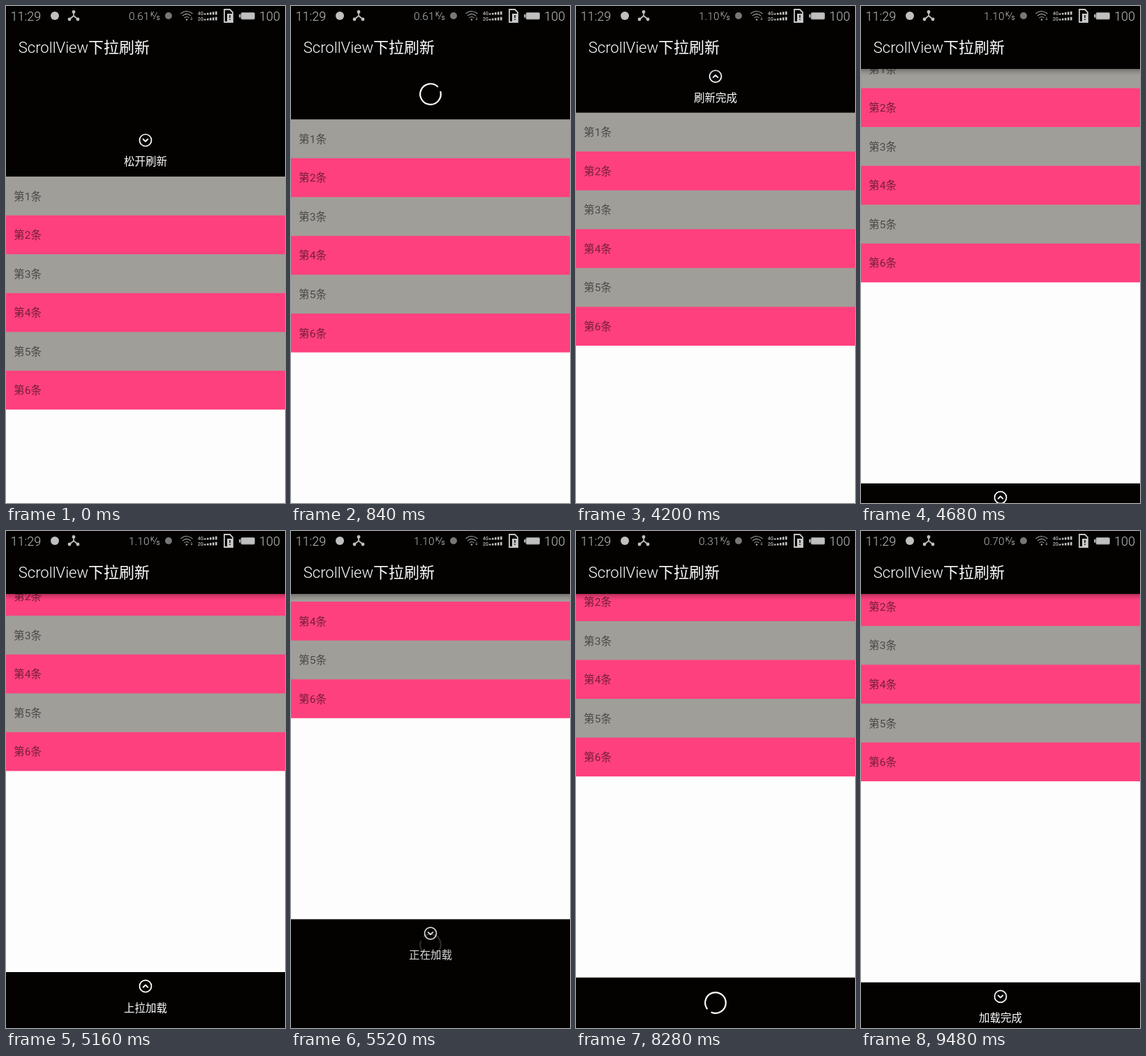
Write an HTML page that moves like this. It is 400x711 px and loops after 9600 ms.

```html
<!DOCTYPE html>
<html lang="zh">
<head>
<meta charset="utf-8">
<title>ScrollView下拉刷新</title>
<style>
  html, body { margin: 0; width: 100%; height: 100%; overflow: hidden; background: #030201; }
  svg { display: block; width: 100%; height: 100%; }
  text { font-family: Roboto, "Noto Sans CJK SC", "Noto Sans CJK", sans-serif; }
  .title { font-size: 22px; font-weight: 300; fill: #fff; }
  .row { font-size: 15.56px; fill: #000; fill-opacity: .54; }
  .label { font-size: 15.56px; fill: #fff; text-anchor: middle; }
  .line { fill: none; stroke: #fff; stroke-linecap: round; stroke-linejoin: round; }
  .status { font-weight: 300; fill: #c0c0c0; }
  .net { font-weight: 400; fill: #b8b8b8; }
  .thin { fill: none; stroke: #a0a0a0; }
</style>
</head>
<body>
<svg viewBox="0 0 400 711" preserveAspectRatio="none">
  <defs>
    <linearGradient id="shade" x1="0" y1="0" x2="0" y2="1">
      <stop offset="0" stop-color="#000" stop-opacity=".3"/>
      <stop offset=".4" stop-color="#000" stop-opacity=".14"/>
      <stop offset="1" stop-color="#000" stop-opacity="0"/>
    </linearGradient>
  </defs>
  <rect width="400" height="711" fill="#030201"/>
  <g id="content">
    <g id="rows"></g>
    <rect y="423.36" width="400" height="287.64" fill="#fdfdfd"/>
    <g id="header" transform="translate(200 17.8)"></g>
    <g id="footer" transform="translate(200 711)"></g>
  </g>
  <rect y="90" width="400" height="9" fill="url(#shade)"/>
  <rect width="400" height="90" fill="#030201"/>
  <text class="title" x="17.8" y="66.7">ScrollView下拉刷新</text>

  <g class="status">
    <text x="6.5" y="21" font-size="18">11:29</text>
    <text x="363" y="21" font-size="18">100</text>
  </g>
  <g class="net">
    <text id="speed" x="176" y="19.5" font-size="15.5" font-weight="300"></text>
    <text x="207" y="14.5" font-size="9">K</text>
    <text x="215.5" y="19.5" font-size="10">s</text>
  </g>
  <path class="thin" d="M211.5 19 L216.5 9"/>
  <circle cx="70" cy="14" r="6" fill="#c0c0c0"/>
  <circle cx="233" cy="14" r="5" fill="#777"/>
  <g fill="#c0c0c0">
    <path d="M97 9 V14 L91 19 M97 14 L103 19" fill="none" stroke="#c0c0c0" stroke-width="1.7"/>
    <circle cx="97" cy="8.5" r="2.4"/>
    <circle cx="91" cy="19" r="2.4"/>
    <circle cx="103" cy="19" r="2.4"/>
  </g>
  <g class="thin" stroke-width="1.1">
    <path d="M250.5 11 Q259 4 267.5 11 M253 14 Q259 8.8 265 14 M255.5 17 Q259 14 262.5 17"/>
    <path d="M266 15.5 V20 M264.5 18.5 L266 20 L267.5 18.5" stroke-width=".8"/>
  </g>
  <circle cx="259" cy="19.5" r="1.3" fill="#a0a0a0"/>
  <g fill="#c0c0c0" font-size="6.5" font-weight="500">
    <text x="275" y="12.7">4G</text>
    <text x="275" y="20.7">2G</text>
  </g>
  <g id="bars" fill="#c0c0c0"></g>
  <path d="M313 5 H321 L325 9 V23 H313 Z" fill="none" stroke="#c8c8c8" stroke-width="1.8"/>
  <rect x="317" y="11" width="8" height="11" fill="#c8c8c8"/>
  <path d="M321 13 V17 M321 18.5 V20" stroke="#030201" stroke-width="1.5"/>
  <rect x="337" y="9.5" width="19.5" height="9.5" rx="1.5" fill="#c0c0c0" stroke="#888"/>
  <rect x="334" y="12" width="2.5" height="4.5" fill="#a8a8a8"/>
</svg>
<script>
const LOOP = 9600, STEP = 120, ROW = 55.56;
const $ = id => document.getElementById(id);

// Each row runs 1px under the next, so no background shows at the seams
$('rows').innerHTML = Array.from({ length: 6 }, (_, i) => {
  const y = 90 + i * ROW;
  return `<rect y="${y}" width="400" height="${ROW + 1}" fill="${i % 2 ? '#ff407e' : '#a09e98'}"/>
    <text class="row" x="11.1" y="${y + 33.6}">第${i + 1}条</text>`;
}).join('');

$('bars').innerHTML = Array.from({ length: 10 }, (_, i) => {
  const n = i % 5, h = 2 + n * 0.7, base = i < 5 ? 12.5 : 20.5;
  return `<rect x="${284 + n * 4}" y="${base - h}" width="2.6" height="${h}"/>`;
}).join('');

// Ring with a gap centred on the positive x axis
const R = 14.8, GAP = 17 * Math.PI / 180;
const gx = R * Math.cos(GAP), gy = R * Math.sin(GAP);

function makePanel(id) {
  const g = $(id);
  g.innerHTML = `<g class="tip">
      <circle class="line" cy="20.2" r="8.5" stroke-width="1.7"/>
      <path class="line arrow" d="M-3.3 -1.5 L0 1.7 L3.3 -1.5" stroke-width="1.9"/>
      <text class="label" y="56.6"></text>
    </g>
    <path class="line ring" d="M${gx} ${gy} A${R} ${R} 0 1 1 ${gx} ${-gy}" stroke-width="2.2"/>`;
  const find = s => g.querySelector(s);
  return { tip: find('.tip'), arrow: find('.arrow'), text: find('text'), ring: find('.ring') };
}

// Pull distance: [time, offset, eased]
const pull = [
  [0, 154], [240, 165.5], [330, 165.5], [730, 72.2, 1],
  [4105, 72.2], [4505, 0, 1], [4560, -7], [4680, -28], [4800, -48], [5040, -48],
  [5160, -80], [5280, -122], [5400, -150], [5480, -157.7], [5880, -72.2, 1],
  [9400, -72.2], [9800, 0, 1]
];

const panels = [
  { ...makePanel('header'), turn: 0, from: 0, release: 330, done: 4105,
    texts: ['松开刷新', '松开刷新', '正在刷新', '刷新完成'] },
  { ...makePanel('footer'), turn: 5200, from: 180, release: 5480, done: 9400,
    texts: ['上拉加载', '松开加载', '正在加载', '加载完成'] }
];

const ramp = (t, start, span) => Math.min(1, Math.max(0, (t - start) / span));
const ease = p => (1 - Math.cos(Math.PI * p)) / 2;

function offsetAt(t) {
  const i = pull.findIndex(k => k[0] > t);
  const [t0, a] = pull[i - 1], [t1, b, eased] = pull[i];
  const p = (t - t0) / (t1 - t0);
  return a + (b - a) * (eased ? ease(p) : p);
}

function drawPanel(p, t) {
  const finished = t >= p.done;
  const phase = finished ? 3 : t >= p.release ? 2 : t >= p.turn ? 1 : 0;
  const shown = ramp(t, p.release, 240);
  const leave = ramp(t, p.done - 100, 100);
  const angle = p.from + 180 * ease(ramp(t, p.turn, 180));
  const spin = -30 + 360 * (t - 840) / 1000;
  p.text.textContent = p.texts[phase];
  p.tip.setAttribute('opacity', finished ? 1 : 1 - shown);
  p.arrow.setAttribute('transform', `translate(0 20.2) rotate(${angle})`);
  p.ring.setAttribute('opacity', finished ? 0 : shown * (1 - leave));
  p.ring.setAttribute('transform', `translate(0 36.1) rotate(${spin}) scale(${1 + 0.32 * leave})`);
}

function draw(now) {
  // The screen refreshes in fixed steps
  const t = Math.floor((now % LOOP) / STEP) * STEP;
  $('content').setAttribute('transform', `translate(0 ${offsetAt(t)})`);
  $('speed').textContent = t < 2880 ? '0.61' : t < 5880 ? '1.10' : t < 8880 ? '0.31' : '0.70';
  panels.forEach(p => drawPanel(p, t));
}

const start = performance.now();
function tick() {
  draw(performance.now() - start);
  requestAnimationFrame(tick);
}
tick();
</script>
</body>
</html>
```
